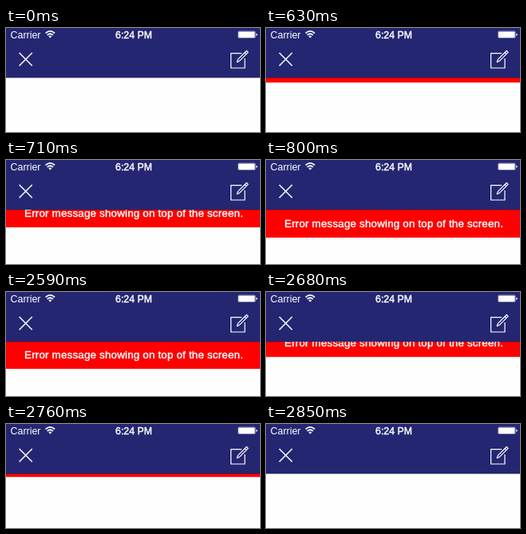
Recreate the animation shown at these times as an HTML page. Size 318 by 130 pixels, loop 3990 ms.

```html
<!DOCTYPE html>
<html lang="en">
<head>
<meta charset="utf-8">
<title>Error banner</title>
<style>
  html, body { margin: 0; width: 100%; height: 100%; overflow: hidden; background: #fff; }
  svg { display: block; width: 318px; height: 130px; }
  text { fill: #fff; font-family: "Liberation Sans", Arial, sans-serif; }
  .medium { text-anchor: middle; stroke: #fff; stroke-width: .45; }
  .line { fill: none; stroke: #fff; }
</style>
</head>
<body>
<svg viewBox="0 0 318 130">
  <rect width="318" height="130" fill="#fefefe"/>

  <g id="banner">
    <rect y="62" width="318" height="36" fill="#f00"/>
    <text class="medium" x="160.1" y="84.5" font-size="13.3" letter-spacing=".22">Error message showing on top of the screen.</text>
  </g>

  <rect width="318" height="62" fill="#242671"/>
  <rect y="62" width="318" height="1" opacity=".25"/>

  <!-- status bar -->
  <text x="5.6" y="12.5" font-size="12.4">Carrier</text>
  <g class="line" stroke-width="1.7">
    <path d="M49.6 6.5Q55.3 1.4 61 6.5"/>
    <path d="M51.7 8.9Q55.3 5.6 58.9 8.9"/>
  </g>
  <path d="M53.3 10.4Q55.3 8.8 57.3 10.4L55.3 12.5Z" fill="#fff"/>
  <text class="medium" x="160" y="12.5" font-size="12.3">6:24 PM</text>
  <rect class="line" x="290.4" y="3.9" width="22" height="8.6" rx="1.6" stroke-width=".6" opacity=".6"/>
  <rect x="291" y="4.5" width="20.6" height="7.4" rx=".9" fill="#fff"/>
  <path d="M313.3 6.7Q314.7 7 314.7 8.2T313.3 9.7Z" fill="#fff"/>

  <!-- close and compose buttons -->
  <path class="line" stroke-width="1.5" d="M16.6 31L32.8 47.2M32.8 31L16.6 47.2"/>
  <path class="line" stroke-width="1.2" d="M295 31.6H281.6V50H299V38"/>
  <path class="line" stroke-width="1.2" stroke-linejoin="round"
        d="M289.2 42.6L290.3 39.4L301.2 28.5L303.1 30.4L292.2 41.3ZM299 30.7L300.9 32.6"/>
</svg>
<script>
  const LOOP = 3990, HEIGHT = 36, SLIDE = 285;
  const SHOW = { start: 548, ticks: [630, 710, 800, 880] };
  const HIDE = { start: 2543, ticks: [2590, 2680, 2760, 2850] };
  const banner = document.getElementById("banner");

  // cubic-bezier(.42, 0, .58, 1), solved by bisection
  function easeInOut(x) {
    if (x <= 0) return 0;
    if (x >= 1) return 1;
    let lo = 0, hi = 1, s = 0.5;
    for (let i = 0; i < 20; i++) {
      s = (lo + hi) / 2;
      const bx = 1.26 * s * (1 - s) ** 2 + 1.74 * s * s * (1 - s) + s ** 3;
      if (bx < x) lo = s; else hi = s;
    }
    return s * s * (3 - 2 * s);
  }

  // eased progress, held between ticks
  function progress({ start, ticks }, t) {
    const held = ticks.filter(tick => tick <= t).pop();
    return held === undefined ? 0 : easeInOut((held - start) / SLIDE);
  }

  function draw(t) {
    const shown = progress(SHOW, t) - progress(HIDE, t);
    const y = (shown - 1) * HEIGHT;
    banner.setAttribute("transform", `translate(0 ${y.toFixed(2)})`);
  }

  const origin = performance.now();
  function frame() {
    draw((performance.now() - origin) % LOOP);
    requestAnimationFrame(frame);
  }
  frame();
</script>
</body>
</html>
```
